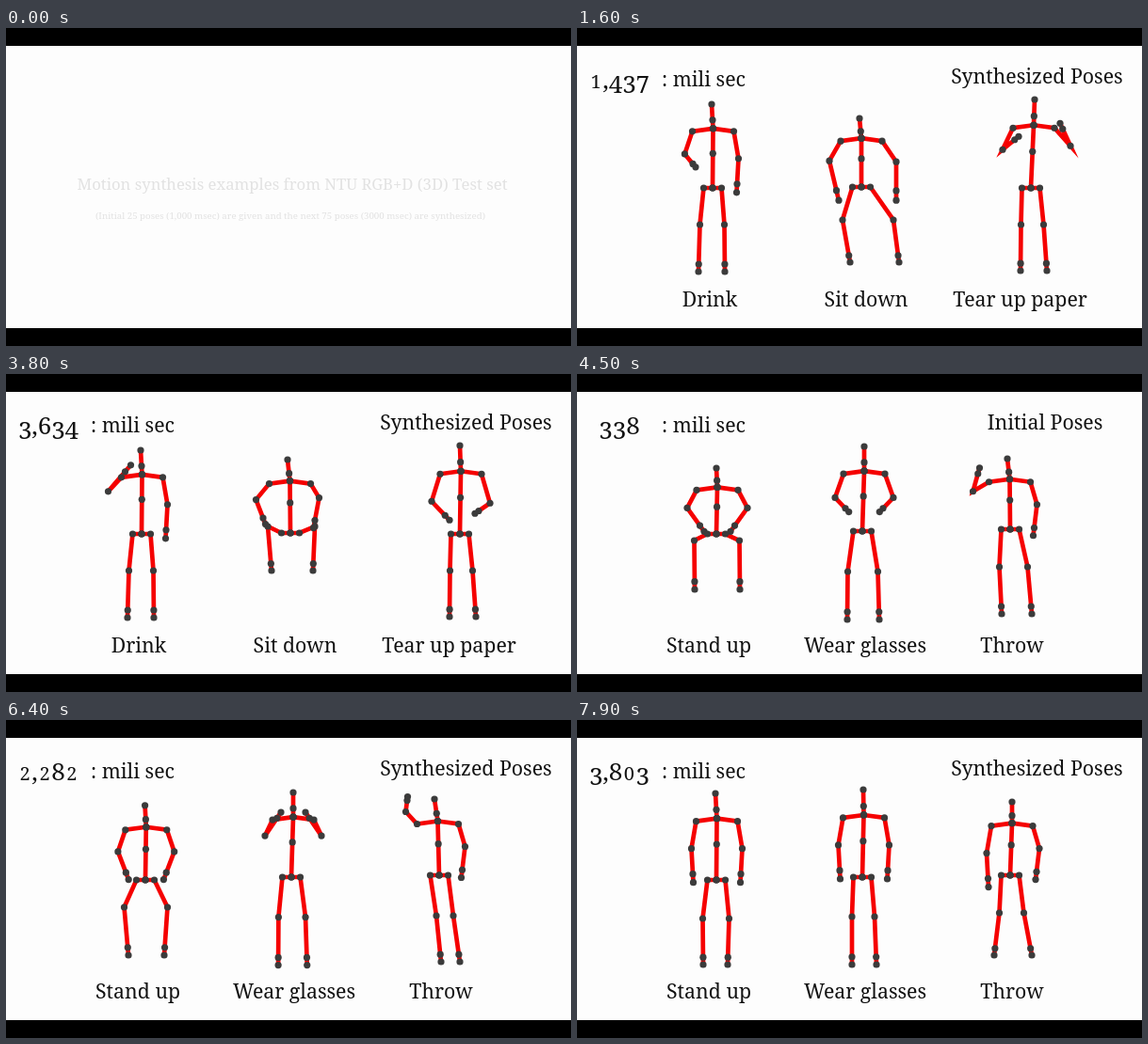
Recreate the animation shown at these times as an HTML page with a canvas. Size 600 px wide and 338 px high, loop 8000 ms.

```html
<!DOCTYPE html>
<html lang="en">
<head>
<meta charset="utf-8">
<title>Motion synthesis</title>
<style>
  html, body { margin: 0; width: 100%; height: 100%; overflow: hidden; background: #000; }
  canvas { display: block; width: 600px; height: 338px; }
</style>
</head>
<body>
<canvas id="stage" width="600" height="338"></canvas>
<script>
const ctx = document.getElementById('stage').getContext('2d');
const LOOP = 8000, STEP = 100;

// Arms: elbow and hand, outwards and down from the chest.
// Legs: knee and foot, outwards and down from the hip, then a sideways shift.
const REST = [27, 32, 25, 68];
const STAND = [13, 39, 14, 89, -1];

// A track is a list of keys: [milliseconds, ...values].
const hold = values => [[0, ...values]];
const rise = [[1057, 32, 22, 14, 47], [3803, ...REST]];
const glasses = [[0, 30, 30, 18, 50], [1057, 34, 23, 11, 23], [2282, 30, 20, 13, -5], [3803, ...REST]];

const acts = [
  { start: 180, figures: [
    { name: 'Drink', x: 141, hip: [144, 170],
      head: hold([143, 81]),
      left: [[0, 27, 32, 22, 68], [3634, 36, 18, 12, -10]],
      right: hold(REST),
      legs: hold(STAND) },
    { name: 'Sit down', x: 307, hip: [302, 169],
      head: [[0, 300, 78], [1437, 300, 96], [2451, 302, 112], [3634, 299, 91]],
      left: [[0, ...REST], [1437, 34, 24, 24, 66], [3634, 36, 20, 26, 46]],
      right: [[0, ...REST], [1437, 37, 25, 37, 66], [3634, 31, 18, 25, 50]],
      legs: [[0, ...STAND], [1437, 27, 35, 26, 80, 14], [2451, 21, 11, 22, 69, 6], [3634, 25, -7, 22, 40, 2]] },
    { name: 'Tear up paper', x: 470.5, hip: [482, 170],
      head: [[1437, 486, 76], [3634, 482, 76]],
      left: [[1437, 33, 26, 16, 12], [3634, 31, 32, 12, 52]],
      right: [[1437, 39, 22, 28, -2], [2451, 31, 32, 14, 30], [3634, 31, 34, 15, 45]],
      legs: hold([12, 39, 14, 88, 3]) }
  ] },
  { start: 4135, figures: [
    { name: 'Stand up', x: 140, hip: [148, 170],
      head: [[1057, 148, 100], [3803, 147, 78]],
      left: rise,
      right: rise,
      legs: [[1057, 24, 7, 24, 59, 1], [2282, 23, 29, 19, 80, 1], [3803, 14, 41, 13, 90, -1]] },
    { name: 'Wear glasses', x: 306, hip: [303, 167],
      head: [[2282, 305, 77], [3803, 304, 74]],
      left: glasses,
      right: glasses,
      legs: [[1057, 16, 43, 17, 94, 1], [3803, 12, 42, 13, 93, 2]] },
    { name: 'Throw', x: 462, hip: [460, 165],
      head: [[1057, 457, 90], [2282, 455, 84], [3803, 462, 87]],
      left: [[1057, 39, 13, 32, -12], [2282, 34, -10, 32, -26], [3803, ...REST]],
      right: hold([29, 27, 25, 60]),
      legs: [[1057, 15, 40, 16, 90, 7], [2282, 9, 43, 10, 92, 12], [3803, 13, 40, 20, 85, 3]] }
  ] }
];

const mix = (a, b, u) => a.map((v, i) => v + (b[i] - v) * u);

// Values of a track at a moment, eased between neighbouring keys.
function sample(track, ms) {
  const next = track.findIndex(key => key[0] > ms);
  if (next < 1) return track.at(next).slice(1);
  const a = track[next - 1], b = track[next];
  const u = (ms - a[0]) / (b[0] - a[0]);
  return mix(a, b, u * u * (3 - 2 * u)).slice(1);
}

function drawFigure(f, ms) {
  const head = sample(f.head, ms), hip = f.hip;
  const chest = mix(head, hip, 0.29);
  chest[0] = (head[0] + hip[0]) / 2 + 1;
  const chains = [[head, mix(head, chest, 0.65), chest, mix(chest, hip, 0.42), hip]];
  const addLimb = (root, joint, bend, end, u) => chains.push([root, joint, bend, mix(bend, end, u), end]);

  for (const side of [-1, 1]) {
    const from = ([x, y], dx, dy) => [x + side * dx, y + dy];
    const [ex, ey, hx, hy] = sample(side < 0 ? f.left : f.right, ms);
    addLimb(chest, from(chest, 22, 3), from(chest, ex, ey), from(chest, hx, hy), 0.75);
    const [kx, ky, fx, fy, shift] = sample(f.legs, ms);
    addLimb(hip, from(hip, 9.5, 0),
      from(hip, kx + side * shift / 2, ky), from(hip, fx + side * shift, fy), 0.84);
  }

  ctx.strokeStyle = '#f50000';
  ctx.lineWidth = 4.7;
  for (const chain of chains) {
    ctx.beginPath();
    chain.forEach(p => ctx.lineTo(...p));
    ctx.stroke();
  }
  ctx.fillStyle = '#3b3b3b';
  for (const [x, y] of chains.flat()) {
    ctx.beginPath();
    ctx.arc(x, y, 3.6, 0, 2 * Math.PI);
    ctx.fill();
  }
}

function text(s, x, y, size = 21.3, color = '#111') {
  ctx.font = size + 'px "Noto Serif", serif';
  ctx.fillStyle = color;
  ctx.textAlign = 'center';
  ctx.fillText(s, x, y);
}

// Old-style figures in even slots: 0-2 are small, 3, 4, 5, 7 and 9 hang low.
function drawClock(value) {
  const chars = [...value.toLocaleString('en-US')];
  const slot = c => c === ',' ? 6.5 : 14.4;
  let x = 45 - chars.reduce((sum, c) => sum + slot(c), 0) / 2;
  for (const c of chars) {
    const drop = '34579'.includes(c) ? 5 : 0;
    text(c, x + slot(c) / 2, 64 + drop, '012'.includes(c) ? 20 : 26);
    x += slot(c);
  }
}

function draw(t) {
  ctx.fillStyle = '#000';
  ctx.fillRect(0, 0, 600, 338);
  ctx.fillStyle = '#fdfdfd';
  ctx.fillRect(0, 19, 600, 300);
  if (t < 100) {
    text('Motion synthesis examples from NTU RGB+D (3D) Test set', 304, 172, 16.7, '#e2e2e2');
    text('(Initial 25 poses (1,000 msec) are given and the next 75 poses (3000 msec) are synthesized)',
      302, 203, 9.7, '#e2e2e2');
    return;
  }
  const { start, figures } = acts[t < 4135 ? 0 : 1];
  // 24 pictures a second, each counted as 42.25 ms
  const ms = Math.ceil(Math.max(0, Math.floor((t - start) * 0.024)) * 42.25);
  drawClock(ms);
  text(': mili sec', 134.5, 62);
  if (ms < 1000) text('Initial Poses', 497, 59);
  else text('Synthesized Poses', 488.5, 59);
  for (const f of figures) {
    drawFigure(f, ms);
    text(f.name, f.x, 296);
  }
}

const begin = performance.now();
function tick() {
  const t = (performance.now() - begin) % LOOP;
  draw(Math.floor(t / STEP) * STEP);
  requestAnimationFrame(tick);
}
tick();
</script>
</body>
</html>
```
